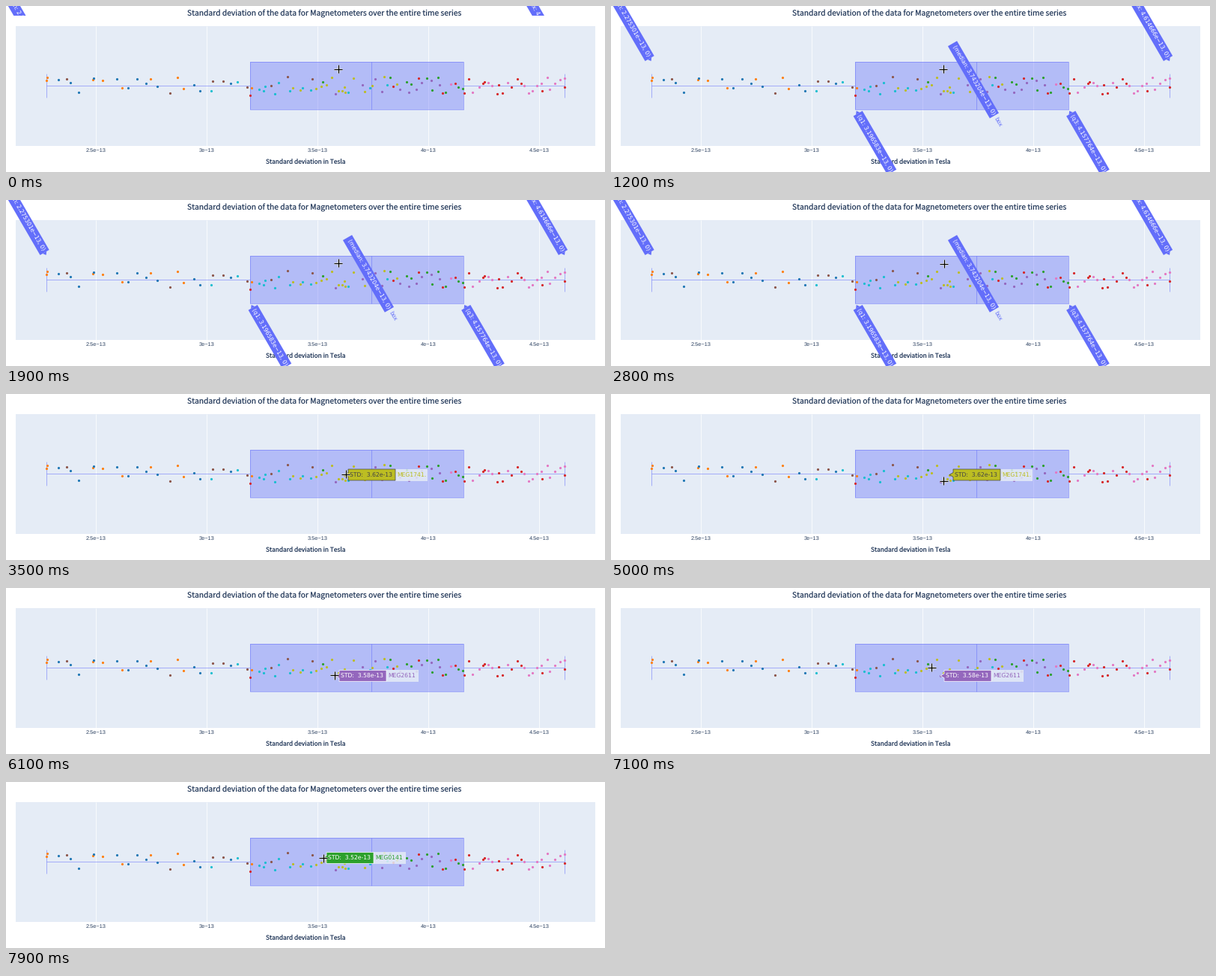
A matplotlib script that plays this animation: 800 px wide and 223 px high, repeating every 8000 ms.

```python
import numpy as np
import matplotlib.pyplot as plt
from matplotlib.animation import FuncAnimation
from matplotlib.patches import Polygon, Rectangle
from matplotlib.transforms import Bbox, TransformedBbox

W, H, DPI = 800, 223, 100
STEP, FRAMES = 100, 80
INK, PLOT_BG, VIOLET = "#2a3f5f", "#e5ecf6", "#636efa"
SANS, PLAIN, WIDE = "Noto Sans CJK JP", "Liberation Sans", "DejaVu Sans"
MINUS = "\u2212"
MID = 106.8

plt.rcParams["text.hinting"] = "none"

fig = plt.figure(figsize=(W / DPI, H / DPI), dpi=DPI, facecolor="white")
ax = fig.add_axes([0, 0, 1, 1])
ax.set_xlim(0, W)
ax.set_ylim(H, 0)
ax.axis("off")


def px(n):
    return n * 72 / DPI


def sx(value):
    """Stage x of a value given in 1e-13 tesla."""
    return 120.3 + (value - 2.5) * 296


def write(x, y, text, size, color=INK, font=WIDE, **kw):
    kw = {"ha": "center", "va": "baseline", **kw}
    return ax.text(x, y, text, fontsize=px(size), color=color, family=font, **kw)


def line(xs, ys, color, width, **kw):
    return ax.plot(xs, ys, color=color, lw=px(width), solid_capstyle="butt", **kw)[0]


def dot(x, y, color):
    ax.plot([x], [y], "o", ms=px(3.2), mew=0, color=color, zorder=4)


# Chart background, grid and titles
ax.add_patch(Rectangle((13, 26.5), 774, 161.5, fc=PLOT_BG, lw=0, zorder=0))
for v in np.arange(2.5, 4.6, 0.5):
    line([sx(v)] * 2, [26.5, 188], "white", 1, alpha=0.75, zorder=1)
    write(sx(v), 196, f"{v:g}e{MINUS}13", 7.35, font=PLAIN)
write(425, 13.9, "Standard deviation of the data for Magnetometers over the entire time series",
      10.27, font=SANS)
write(400, 213.3, "Standard deviation in Tesla", 8.35, font=SANS)

# Box plot
STATS = dict(min="2.275301", q1="3.196583", median="3.743204", q3="4.157764", max="4.614666")
QUARTILES = [sx(float(s)) for s in STATS.values()]
LOW, Q1, MEDIAN, Q3, HIGH = QUARTILES
TOP, BASE = 74.6, 139
ax.add_patch(Rectangle((Q1, TOP), Q3 - Q1, BASE - TOP, fc=VIOLET, alpha=0.38, lw=0, zorder=2))
edge = dict(color=VIOLET, width=1, alpha=0.5, zorder=3)
line([Q1, Q3, Q3, Q1, Q1], [TOP, TOP, BASE, BASE, TOP], **edge)
line([MEDIAN] * 2, [TOP, BASE], **edge)
for end, side in ((LOW, Q1), (HIGH, Q3)):
    line([end, side], [MID, MID], **edge)
    line([end] * 2, [MID - 16, MID + 16], **edge)

# Sensor dots follow the quartiles; each colour gathers around its own rank
PALETTE = {"#1f77b4": 0.08, "#ff7f0e": 0.12, "#17becf": 0.38, "#8c564b": 0.33, "#bcbd22": 0.42,
           "#9467bd": 0.55, "#2ca02c": 0.6, "#d62728": 0.8, "#e377c2": 0.9}
BLUE, ORANGE, CYAN, BROWN, OLIVE, PURPLE, GREEN, RED, PINK = PALETTE
rng = np.random.default_rng(11)
COUNT = 104
centres = np.array(list(PALETTE.values()))
for rank in (np.arange(COUNT) + rng.random(COUNT)) / COUNT:
    weight = np.exp(-((rank - centres) / 0.13) ** 2)
    color = rng.choice(list(PALETTE), p=weight / weight.sum())
    dot(np.interp(rank, np.linspace(0, 1, 5), QUARTILES), MID + rng.uniform(-12, 12), color)
dot(LOW, 99.5, ORANGE)
dot(Q1, 119.5, RED)
dot(HIGH, 97.3, PINK)

# Slanted statistic labels
ALONG = np.array([0.5, np.sqrt(0.75)])
ACROSS = np.array([ALONG[1], -0.5])
stat_labels = []


def slanted(start, length, text, tip=0, color="white", fc=VIOLET, alpha=1):
    """Strip running down and right from start; tip -1 or 1 puts an arrow on that end."""
    start = np.array(start)
    end = start + ALONG * length
    half = ACROSS * 7
    shapes = [[start + half, end + half, end - half, start - half]]
    if tip:
        root = start if tip < 0 else end
        shapes.append([root + ACROSS * 3, root + ALONG * 4 * tip, root - ACROSS * 3])
    for shape in shapes:
        stat_labels.append(ax.add_patch(Polygon(shape, fc=fc, alpha=alpha, lw=0, zorder=6)))
    x, y = (start + end) / 2
    stat_labels.append(write(x, y, text, 7.6, color, va="center", rotation=-60,
                             rotation_mode="anchor", zorder=7, clip_on=True))
    return end


def stat_text(name):
    return f"({name}: {STATS[name]}e{MINUS}13, 0)"


for x, name in ((LOW, "min"), (HIGH, "max")):
    slanted(np.array([x - 2.2, 70.5]) - ALONG * 100, 100, stat_text(name), tip=1)
for x, name in ((Q1, "q1"), (Q3, "q3")):
    slanted((x + 3.2, 144.4), 91, stat_text(name), tip=-1)
tail = slanted((456, 50.5), 112, stat_text("median"))
slanted(tail, 20, "box", color=VIOLET, fc=PLOT_BG, alpha=0.8)


def strip_box(top, bottom):
    return TransformedBbox(Bbox([[0, bottom], [W, top]]), ax.transData)


WHOLE, HEAD, FOOT = strip_box(0, H), strip_box(0, 12.6), strip_box(216, H)


# Point tooltips
def tooltip(x, y, value, sensor, fill, ink="white", border="white"):
    dot(x, y, fill)
    left, right, top, bottom = x + 5, x + 68, y - 7.5, y + 7.5
    shape = [(x, y), (left, y - 3), (left, top), (right, top),
             (right, bottom), (left, bottom), (left, y + 3)]
    tag = Rectangle((right, top - 0.5), 42.5, 16, fc=PLOT_BG, alpha=0.85, lw=0, zorder=6)
    body = Polygon(shape, fc=fill, ec=border, lw=px(0.7), zorder=7)
    ax.add_patch(tag)
    ax.add_patch(body)
    style = dict(ha="left", zorder=8)
    return [tag, body,
            write(left + 2, y + 2.9, f"STD:  {value}e-13", 7.7, ink, **style),
            write(right + 2, y + 2.9, sensor, 7.6, fill, **style)]


tips = [
    (3400, 5300, tooltip(452, 108.5, "3.62", "MEG1741.", OLIVE, "#444444", "#444444")),
    (5300, 7200, tooltip(440, 118, "3.58", "MEG2611", PURPLE)),
    (7200, 8000, tooltip(423, 102, "3.52", "MEG0141", GREEN)),
]

# Crosshair pointer
arms = [line([], [], "white", 3, alpha=0.8, zorder=9) for _ in range(2)]
arms += [line([], [], "black", 1.3, zorder=10) for _ in range(2)]

START = np.array([443.7, 84.8])
MOVES = [(1700, 2500, (444.5, 85.8)), (2900, 3400, (453.7, 107.8)), (4300, 5000, (444, 116.8)),
         (5000, 5400, (438.5, 117.3)), (6600, 7400, (423.7, 102))]


def pointer(t):
    pos = START
    for t0, t1, goal in MOVES:
        u = np.clip((t - t0) / (t1 - t0), 0, 1)
        pos = pos + (np.array(goal) - pos) * u * u * (3 - 2 * u)
    return pos


def draw(i):
    t = i * STEP
    clip = HEAD if t < 100 else WHOLE if t < 3400 else FOOT
    for part in stat_labels:
        part.set_visible(t < 3500)
        part.set_clip_box(clip)
    for start, end, parts in tips:
        for part in parts:
            part.set_visible(start <= t < end)
    x, y = pointer(t)
    reach = np.array([-5.5, 5.5])
    for across, down in (arms[:2], arms[2:]):
        across.set_data(x + reach, [y, y])
        down.set_data([x, x], y + reach)
    return arms


anim = FuncAnimation(fig, draw, frames=FRAMES, interval=STEP, init_func=lambda: draw(0),
                     repeat=True, repeat_delay=0, blit=False)
plt.show()
```
